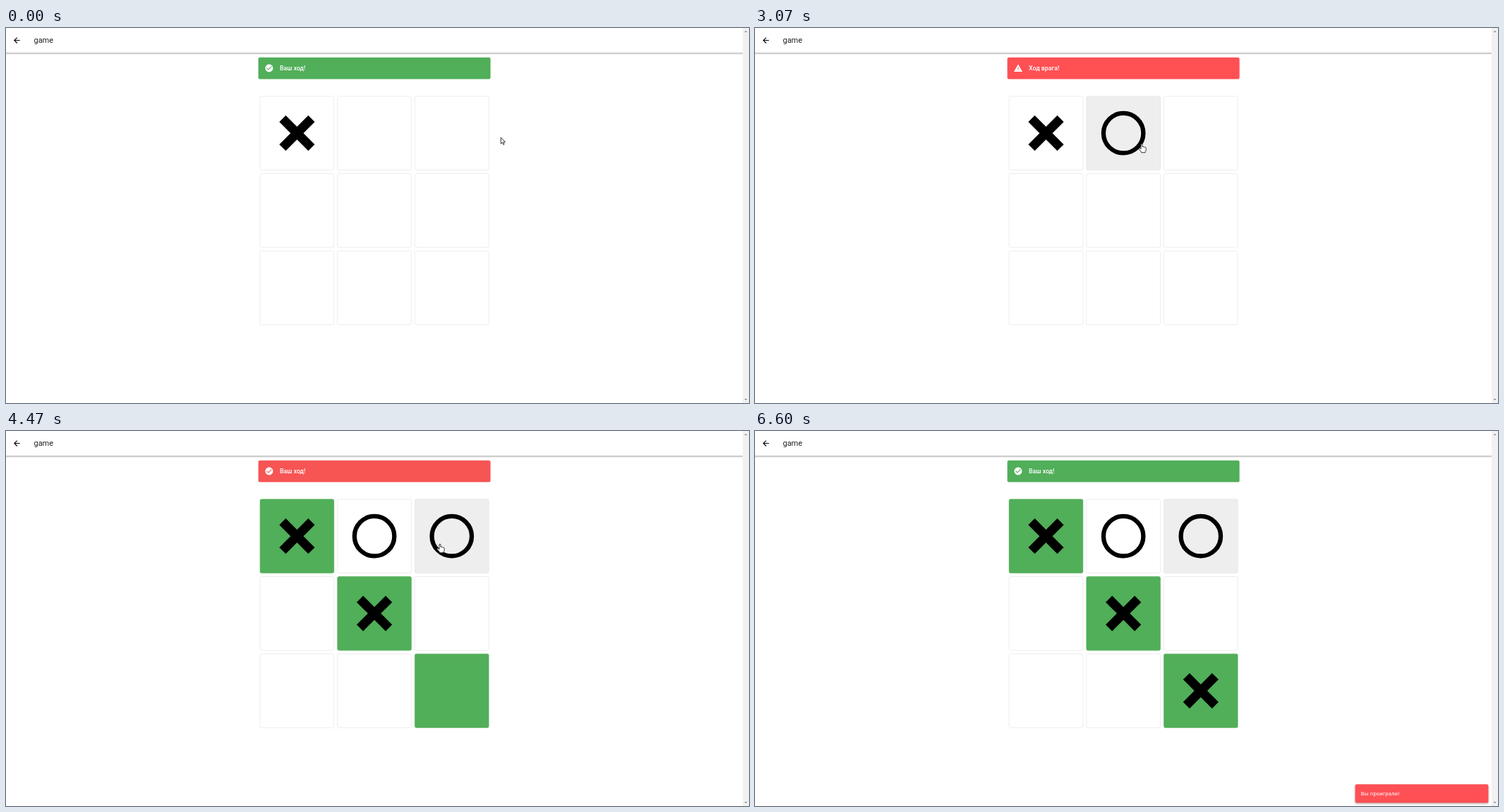
Recreate the animation shown at these times as an HTML page. Size 1053 by 532 pixels, loop 8 s.

```html
<!DOCTYPE html>
<html lang="ru">
<head>
<meta charset="utf-8">
<title>game</title>
<style>
  html, body { margin: 0; width: 100%; height: 100%; overflow: hidden; background: #fff; }
  svg { display: block; width: 1053px; height: 532px; font-family: Roboto, sans-serif; }
  #toast rect { filter: drop-shadow(0 2px 3px rgba(0, 0, 0, .35)); }
</style>
</head>
<body>
<svg viewBox="0 0 1053 532">
  <defs>
    <linearGradient id="shade" x1="0" y1="0" x2="0" y2="1">
      <stop offset="0" stop-color="#000" stop-opacity=".36"/>
      <stop offset=".4" stop-color="#000" stop-opacity=".14"/>
      <stop offset="1" stop-color="#000" stop-opacity="0"/>
    </linearGradient>
    <path id="cross" d="M20 6.91L17.09 4 12 9.09 6.91 4 4 6.91 9.09 12 4 17.09 6.91 20 12 14.91 17.09 20 20 17.09 14.91 12Z"/>
    <circle id="ring" cx="12" cy="12" r="9" fill="none" stroke="#000" stroke-width="2"/>
  </defs>
  <!-- page units: a 1920 px wide window -->
  <g transform="scale(.54844)">
    <rect y="64" width="1904" height="6" fill="url(#shade)"/>
    <path transform="translate(16 20)" d="M20 11V13H8L13.5 18.5 12.08 19.92 4.16 12 12.08 4.08 13.5 5.5 8 11Z"/>
    <text x="72" y="39" font-size="20" fill="#212121">game</text>

    <rect id="banner" x="652" y="76" width="600" height="56" rx="4"/>
    <g fill="#fff">
      <path id="good" transform="translate(668 92)" d="M12 2C6.5 2 2 6.5 2 12S6.5 22 12 22 22 17.5 22 12 17.5 2 12 2M10 17L5 12 6.41 10.59 10 14.17 17.59 6.58 19 8Z"/>
      <path id="bad" transform="translate(668 92)" d="M13 14H11V9H13M13 18H11V16H13M1 21H23L12 2Z"/>
      <text id="label" x="707.5" y="109.5" font-size="16" font-weight="500"></text>
    </g>

    <g id="board"></g>

    <g id="toast">
      <rect x="1551" y="914" width="344" height="48" rx="4" fill="#ff5055"/>
      <text x="1566" y="942" font-size="14" letter-spacing=".25" fill="#fff">Вы проиграли!</text>
    </g>
  </g>

  <rect x="1044" width="9" height="532" fill="#f1f1f1"/>
  <path d="M1046.5 6l2-2.2 2 2.2ZM1046.5 526l2 2.2 2-2.2Z" fill="#8a8a8a"/>

  <g id="cursor" fill="#fff" stroke="#222" stroke-width=".9" stroke-linejoin="round">
    <path id="arrow" d="M.4 .4V9.2L2.4 7.4 3.8 10.5 5.2 9.9 3.8 6.8H6.6Z"/>
    <path id="hand" d="M-1 1Q0 -.3 1 1V4.6Q2 3.8 2.8 4.9 3.9 4.2 4.6 5.3 6 4.9 6.2 6.4V9Q6.1 10.6 5.2 11.4V12.7H-.5V11.7L-4 7.6Q-4.4 6.2 -3 6.2L-1 7.8Z"/>
  </g>
</svg>
<script>
const LOOP = 8000, FRAME = 1000 / 15;
const GREEN = [81, 174, 89], RED = [255, 80, 84];
const CELL = 192, PITCH = 200, LEFT = 656, TOP = 176, SCALE = .54844;
const $ = id => document.getElementById(id);

function make(name, attrs, parent) {
  const el = document.createElementNS('http://www.w3.org/2000/svg', name);
  for (const key in attrs) el.setAttribute(key, attrs[key]);
  return parent.appendChild(el);
}

const clamp = v => Math.min(1, Math.max(0, v));

// CSS-style cubic-bezier easing
function bezier(x1, y1, x2, y2) {
  const at = (a, b, s) => 3 * s * (1 - s) ** 2 * a + 3 * s * s * (1 - s) * b + s ** 3;
  return x => {
    if (x <= 0 || x >= 1) return clamp(x);
    let lo = 0, hi = 1;
    for (let i = 0; i < 20; i++) {
      const mid = (lo + hi) / 2;
      if (at(x1, x2, mid) < x) lo = mid; else hi = mid;
    }
    return at(y1, y2, lo);
  };
}
const swift = bezier(.25, .8, .5, 1);
const standard = bezier(.4, 0, .2, 1);
const progress = (t, start, length = 300, ease = swift) => ease((t - start) / length);

// cell index, mark, time it appears
const marks = [
  [0, 'cross', -999], [1, 'ring', 1833], [4, 'cross', 3150],
  [2, 'ring', 3815], [8, 'cross', 4490]
];
const winners = [0, 4, 8], WIN = 4462;
// cell, press time, blur time, pointer
const presses = [
  { cell: 1, start: 1610, blur: 3670, x: 531, y: 164 },
  { cell: 2, start: 3670, blur: Infinity, x: 615, y: 161 }
];
// time, banner is green
const turns = [[-999, true], [1726, false], [3120, true], [3792, false], [4462, true]];
// time, x, y of the pointer
const track = [
  [0, 701, 155],
  [460, 687, 159], [530, 642, 167], [595, 584, 171], [660, 540, 171], [730, 524, 169],
  [865, 528, 167], [930, 531, 164],
  [3065, 548, 164], [3130, 554, 165], [3195, 562, 165], [3265, 573, 165], [3330, 585, 164],
  [3395, 597, 163], [3465, 606, 162], [3530, 612, 161], [3595, 615, 160],
  [5930, 620, 170], [5995, 600, 210], [6065, 545, 262], [6130, 470, 312], [6195, 385, 360],
  [6265, 300, 400], [6330, 220, 436], [6395, 150, 468], [6465, 90, 498], [6530, 42, 521],
  [6595, -50, 560]
];

const cells = [...Array(9).keys()].map(i => {
  const x = LEFT + i % 3 * PITCH, y = TOP + Math.floor(i / 3) * PITCH;
  const box = { x: x + .5, y: y + .5, width: CELL - 1, height: CELL - 1, rx: 4 };
  make('rect', box, make('clipPath', { id: 'clip' + i }, $('board')));
  return {
    x, y,
    rect: make('rect', box, $('board')),
    ripple: make('circle', { 'clip-path': `url(#clip${i})` }, $('board'))
  };
});
const icons = marks.map(([i, kind]) => make('use', {
  href: '#' + kind,
  transform: `translate(${cells[i].x + CELL / 2} ${cells[i].y + CELL / 2}) scale(5.72) translate(-12 -12)`
}, $('board')));

const show = (el, on) => el.setAttribute('visibility', on ? 'visible' : 'hidden');

function drawBanner(t) {
  const [start, green] = turns.filter(turn => turn[0] <= t).pop();
  const [from, to] = green ? [RED, GREEN] : [GREEN, RED];
  const p = progress(t, start);
  $('banner').setAttribute('fill', `rgb(${from.map((c, k) => Math.round(c + (to[k] - c) * p))})`);
  $('label').textContent = green ? 'Ваш ход!' : 'Ход врага!';
  show($('good'), green);
  show($('bad'), !green);
}

function drawBoard(t) {
  cells.forEach(({ rect }, i) => {
    const won = t >= WIN && winners.includes(i);
    rect.setAttribute('fill', won ? `rgb(${GREEN})` : '#fff');
    rect.setAttribute('stroke', won ? `rgb(${GREEN})` : '#dfdfdf');
  });
  for (const { cell, start, blur, x, y } of presses) {
    const { x: cx, y: cy, rect, ripple } = cells[cell];
    const focus = progress(t, start, 200, clamp) - progress(t, blur, 200, clamp);
    const grey = Math.round(255 - 17 * (focus > 0 ? focus ** .4 : 0));
    rect.setAttribute('fill', `rgb(${grey},${grey},${grey})`);

    const grow = progress(t, start, 250, standard);
    const mid = (from, to) => from + (to - from) * grow;
    ripple.setAttribute('cx', mid(x / SCALE, cx + CELL / 2));
    ripple.setAttribute('cy', mid(y / SCALE, cy + CELL / 2));
    ripple.setAttribute('r', CELL * Math.SQRT1_2 * (.3 + .7 * grow));
    const alpha = progress(t, start, 75, clamp) * (1 - progress(t, start + 250));
    ripple.setAttribute('opacity', .24 * alpha);
  }
  icons.forEach((icon, k) => icon.setAttribute('opacity', progress(t, marks[k][2])));
}

function drawToast(t) {
  const p = progress(t, 4500, 150, standard), size = .8 + .2 * p;
  $('toast').setAttribute('opacity', p);
  $('toast').setAttribute('transform', `translate(1723 938) scale(${size}) translate(-1723 -938)`);
}

function drawCursor(t) {
  const [, x, y] = track.filter(step => step[0] <= t).pop();
  const over = cells.some(c => {
    const dx = x / SCALE - c.x, dy = y / SCALE - c.y;
    return dx >= 0 && dx <= CELL && dy >= 0 && dy <= CELL;
  });
  $('cursor').setAttribute('transform', `translate(${x} ${y})`);
  show($('hand'), over);
  show($('arrow'), !over);
}

const origin = performance.now();
function tick() {
  const now = (performance.now() - origin) % LOOP;
  // the screen is sampled at 15 fps and rests after the game ends
  let t = Math.floor((now + 3.5) / FRAME) * FRAME;
  if (t > 4660 && t < 5930) t = 4667;
  drawBanner(t);
  drawBoard(t);
  drawToast(t);
  drawCursor(t);
  requestAnimationFrame(tick);
}
tick();
</script>
</body>
</html>
```
